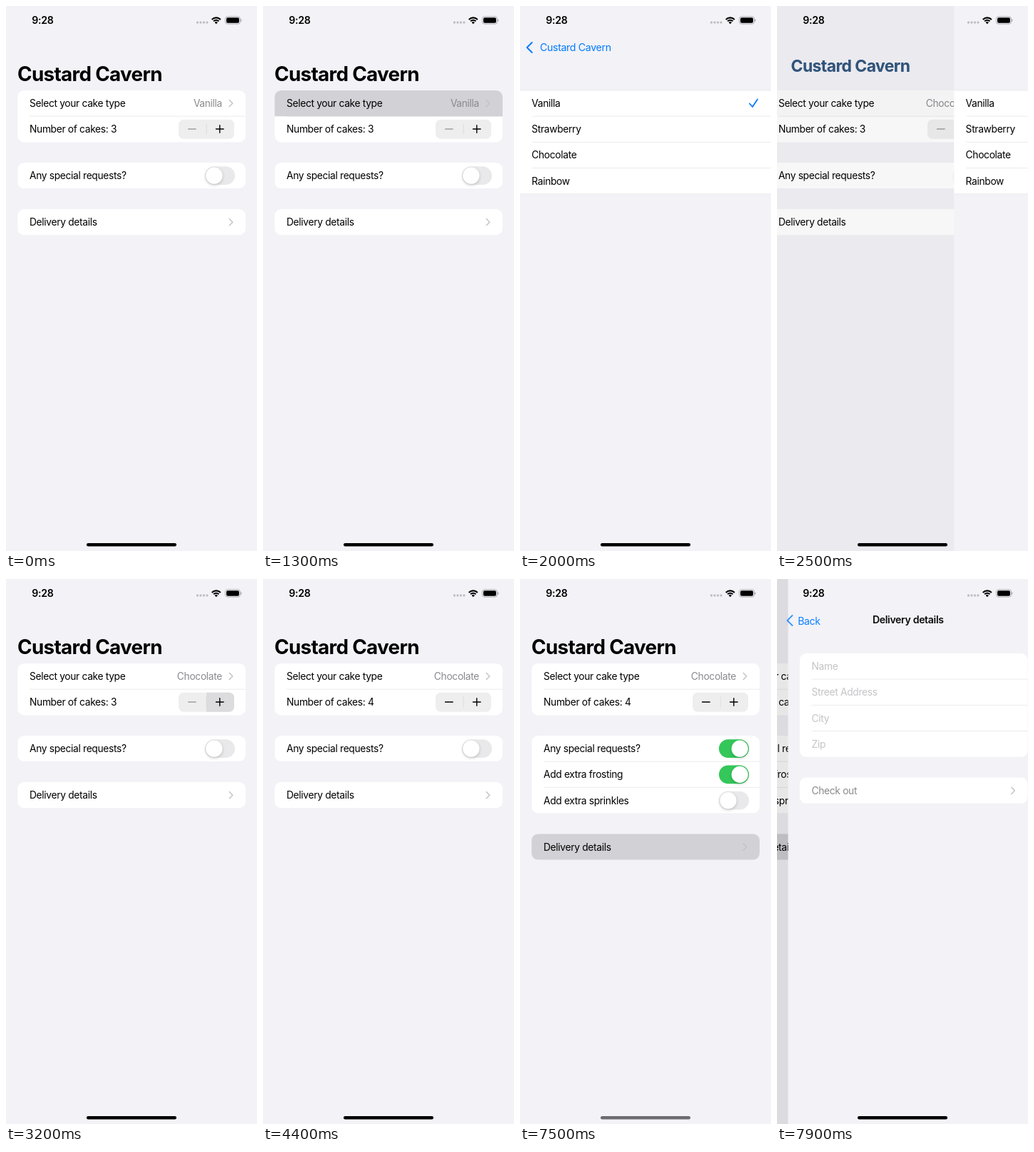
Recreate the animation shown at these times as an HTML page with a canvas. Size 352x762 px, loop 8000 ms.

```html
<!DOCTYPE html>
<html lang="en">
<head>
<meta charset="utf-8">
<title>Cake order form</title>
<style>
html, body { margin: 0; width: 100%; height: 100%; overflow: hidden; background: #f2f2f7; }
canvas { display: block; width: 352px; height: 762px; }
</style>
</head>
<body>
<canvas id="stage"></canvas>
<script>
const W = 352, H = 762, LOOP = 8000;
const ROW = 36.2, LEFT = 16.3, CARD = 319.7;
const BG = '#f2f2f7', LINE = '#ebebed', GREY = '#8a8a8e', PALE = '#c4c4c7', BLUE = '#007aff', PRESSED = '#d1d1d6';
const BODY = 13.8, TITLE = 27.8, TRACK = -0.0245;
const NAME = 'Custard Cavern';
const PUSH_LIST = 1300, POP_LIST = 2366, ADD_CAKE = 3250, EXPAND = 5180, FROST = 6380, TAP = 7480, PUSH_FORM = 7633;

const canvas = document.getElementById('stage');
const ctx = canvas.getContext('2d');
const dpr = window.devicePixelRatio || 1;
canvas.width = W * dpr;
canvas.height = H * dpr;

const clamp = v => Math.max(0, Math.min(1, v));
const ease = v => { const u = clamp(v); return u * u * (3 - 2 * u); };
// Remaining distance of a critically damped spring.
const spring = ms => { const a = Math.max(0, ms) * 0.01826; return (1 + a) * Math.exp(-a); };

function text(str, x, y, { size = BODY, weight = 400, color = '#000', align = 'left' } = {}) {
  ctx.font = `${weight} ${size}px Inter, Roboto, sans-serif`;
  ctx.letterSpacing = `${size * TRACK}px`;
  ctx.textAlign = align;
  ctx.fillStyle = color;
  ctx.fillText(str, x, y + size * 0.36);
}

function box(x, y, w, h, r, color) {
  ctx.fillStyle = color;
  ctx.beginPath();
  ctx.roundRect(x, y, w, h, r);
  ctx.fill();
}

function stroke(points, color, width) {
  ctx.strokeStyle = color;
  ctx.lineWidth = width;
  ctx.lineCap = ctx.lineJoin = 'round';
  ctx.beginPath();
  points.forEach(([x, y], i) => i ? ctx.lineTo(x, y) : ctx.moveTo(x, y));
  ctx.stroke();
}

function faded(alpha, draw) {
  ctx.save();
  ctx.globalAlpha *= clamp(alpha);
  draw();
  ctx.restore();
}

function shifted(x, draw) {
  ctx.save();
  ctx.translate(x, 0);
  draw();
  ctx.restore();
}

const rule = (x, y, right) => { ctx.fillStyle = LINE; ctx.fillRect(x, y - 0.5, right - x, 1); };
const arrow = y => stroke([[313.3, y - 4.6], [317.8, y], [313.3, y + 4.6]], PALE, 1.5);

function card(y, rows) {
  box(LEFT, y, CARD, rows * ROW, 9, '#fff');
  for (let i = 1; i < rows; i++) rule(33, y + i * ROW, LEFT + CARD);
}

function toggle(y, on) {
  box(279, y - 12.9, 42, 25.8, 13, '#e9e9eb');
  faded(on, () => box(279, y - 12.9, 42, 25.8, 13, '#34c759'));
  ctx.save();
  ctx.shadowColor = 'rgba(0,0,0,.2)';
  ctx.shadowBlur = 4 * dpr;
  ctx.shadowOffsetY = 1.5 * dpr;
  box(280.3 + 16.3 * on, y - 11.6, 23.2, 23.2, 11.6, '#fff');
  ctx.restore();
}

function stepper(t) {
  const y = 172, more = t >= ADD_CAKE;
  box(242, y - 13.3, 78, 27, 7, '#eeeeef');
  if (t >= 3180 && t < 3380) box(281, y - 13.3, 39, 27, [0, 7, 7, 0], '#dcdcde');
  ctx.fillStyle = '#d9d9dc';
  ctx.fillRect(280.6, y - 7.5, 0.9, 15);
  stroke([[255.6, y], [266.2, y]], more ? '#000' : '#a0a0a3', 1.4);
  stroke([[294.5, y], [305.1, y]], '#000', 1.4);
  stroke([[299.8, y - 5.3], [299.8, y + 5.3]], '#000', 1.4);
}

function order(t, p) {
  ctx.fillStyle = BG;
  ctx.fillRect(0, 0, W + 110, H);

  const press = t < PUSH_LIST - 20 ? 0 : t < POP_LIST ? 1 : t < 4000 ? p * p : 0;
  card(118, 2);
  if (press) faded(press, () => box(LEFT, 118, CARD, ROW, [9, 9, 0, 0], PRESSED));
  text('Select your cake type', 33, 136);
  text(t < POP_LIST ? 'Vanilla' : 'Chocolate', 303, 136, { color: GREY, align: 'right' });
  arrow(136);
  text(`Number of cakes: ${t < ADD_CAKE ? 3 : 4}`, 33, 172.3);
  stepper(t);

  const open = ease((t - EXPAND) / 450), grow = 2 * ROW * open;
  ctx.save();
  ctx.beginPath();
  ctx.roundRect(LEFT, 219, CARD, ROW + grow, 9);
  ctx.clip();
  card(219, open ? 3 : 1);
  text('Any special requests?', 33, 237.2);
  toggle(237.2, ease((t - EXPAND + 20) / 300));
  if (open) faded(open, () => {
    text('Add extra frosting', 33, 273.4);
    toggle(273.4, ease((t - FROST) / 300));
    text('Add extra sprinkles', 33, 309.7);
    toggle(309.7, 0);
  });
  ctx.restore();

  box(LEFT, 284 + grow, CARD, ROW, 9, t >= TAP ? PRESSED : '#fff');
  text('Delivery details', 33, 302.2 + grow);
  arrow(302.2 + grow);
}

function flavours(t) {
  ctx.fillStyle = BG;
  ctx.fillRect(0, 0, W, H);
  ctx.fillStyle = '#fff';
  ctx.fillRect(0, 118, W, 4 * ROW);
  rule(0, 118, W);
  ['Vanilla', 'Strawberry', 'Chocolate', 'Rainbow'].forEach((name, i) => {
    const y = 136 + i * ROW;
    text(name, 16.3, y);
    rule(i < 3 ? 17 : 0, 118 + (i + 1) * ROW, W);
    if (i === (t < POP_LIST ? 0 : 2)) stroke([[322, y + 0.5], [326, y + 5], [333, y - 5.5]], BLUE, 1.8);
  });
}

function delivery() {
  ctx.fillStyle = BG;
  ctx.fillRect(0, 0, W, H);
  card(104, 4);
  ['Name', 'Street Address', 'City', 'Zip'].forEach((name, i) =>
    text(name, 33, 122.2 + i * ROW, { color: PALE }));
  card(277.6, 1);
  text('Check out', 33, 295.8, { color: GREY });
  arrow(295.8);
}

function navigation(p, form) {
  // The large title shrinks, thins and turns blue on its way to the back button.
  const size = TITLE * (1 - 0.49 * p ** 0.83), weight = Math.round(700 - 300 * p * p);
  const x = 16 + 12 * p, y = 95 - 37.5 * p;
  faded(form ? 1 - 1.06 * p : 1 - p, () => text(NAME, x, y, { size, weight }));
  if (!p) return;
  faded(p, () => {
    if (form) {
      text('Back', x + 1.7, y, { size: 14.1, color: BLUE });
      text('Delivery details', 176 + 176 * (1 - p), 57, { size: 14.1, weight: 600, align: 'center' });
    } else {
      text(NAME, x, y, { size, weight, color: BLUE });
    }
  });
  const slide = 106 * (1 - p);
  faded((p - 0.88) / 0.1, () =>
    stroke([[16.8 + slide, 51], [9.8 + slide, 58], [16.8 + slide, 65]], BLUE, 1.9));
}

function statusBar(t) {
  text('9:28', 36.3, 20, { size: 14.2, weight: 600 });
  for (let i = 0; i < 4; i++) box(267 + i * 4.5, 21.6, 2.9, 2.9, 0.9, '#bcbcc0');
  ctx.strokeStyle = '#000';
  ctx.lineCap = 'butt';
  ctx.lineWidth = 2.1;
  for (const r of [5.2, 8.6]) {
    ctx.beginPath();
    ctx.arc(294.8, 25, r, -Math.PI * 0.75, -Math.PI * 0.25);
    ctx.stroke();
  }
  ctx.fillStyle = '#000';
  ctx.beginPath();
  ctx.moveTo(294.8, 25.3);
  ctx.arc(294.8, 25, 3, -Math.PI * 0.75, -Math.PI * 0.25);
  ctx.fill();
  ctx.strokeStyle = '#a6a6aa';
  ctx.lineWidth = 0.9;
  ctx.beginPath();
  ctx.roundRect(307.5, 14.8, 21, 10.4, 3.2);
  ctx.stroke();
  box(309, 16.3, 18, 7.4, 2, '#000');
  box(329.2, 18.3, 1.2, 3.4, 0.6, '#a6a6aa');
  box(113, 751, 126, 4.5, 2.2, t >= EXPAND && t < PUSH_FORM ? '#6c6c70' : '#000');
}

function draw(t) {
  const form = t >= 5000;
  let p = t < POP_LIST ? 1 - spring(t - PUSH_LIST) : t < PUSH_FORM ? spring(t - POP_LIST) : 1 - spring(t - PUSH_FORM);
  if (p < 0.001) p = 0;
  ctx.setTransform(dpr, 0, 0, dpr, 0, 0);
  shifted(-0.3 * W * p, () => order(t, p));
  if (p) {
    ctx.fillStyle = `rgba(0,0,0,${0.1 * p})`;
    ctx.fillRect(0, 0, W, H);
    shifted(W * (1 - p), () => form ? delivery() : flavours(t));
  }
  navigation(p, form);
  statusBar(t);
}

const start = performance.now();
function tick() {
  draw((performance.now() - start) % LOOP);
  requestAnimationFrame(tick);
}
tick();
</script>
</body>
</html>
```
